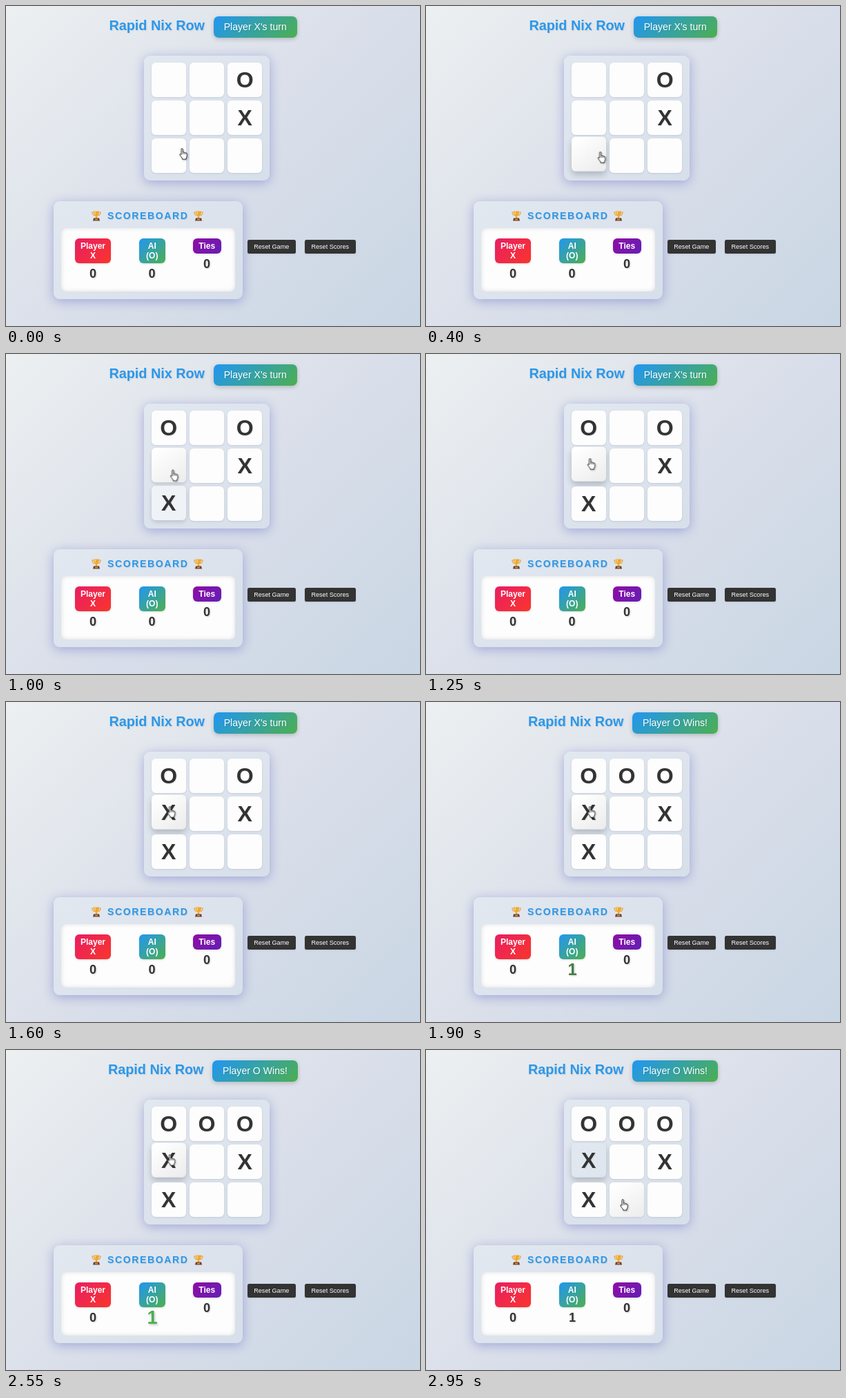
An HTML page that plays this animation: 600x464 px, repeating every 3 s.

```html
<!DOCTYPE html>
<html lang="en">
<head>
<meta charset="utf-8">
<title>Rapid Nix Row</title>
<style>
  html, body { margin: 0; width: 100%; height: 100%; overflow: hidden; }
  body { font-family: "Liberation Sans", Arial, sans-serif; color: #333; }
  .stage {
    position: relative; width: 600px; height: 464px; overflow: hidden;
    background: linear-gradient(135deg, #ecf0f1 0%, #dadfea 50%, #c9d6e4 100%);
  }
  .stage * { box-sizing: border-box; }
  .abs, .panel, .cell, .badge, .score, .button, .status, .trophy { position: absolute; }

  .header { position: absolute; inset: 0; }
  .title {
    position: absolute; left: 149.5px; top: 16px; white-space: nowrap;
    font: bold 19.8px/25px "Liberation Sans", Arial, sans-serif;
    color: #2b98ea; text-shadow: 1px 1px 2px rgba(0, 0, 0, .1);
  }
  .status {
    left: 300.5px; top: 15px; width: 121.5px; height: 31px; border-radius: 7px;
    font-size: 14.1px; line-height: 31px; text-align: center; white-space: nowrap; color: #fff;
    background: linear-gradient(135deg, #2196f3, #4caf50);
    box-shadow: 0 2px 6px rgba(0, 0, 0, .2);
    text-shadow: 1px 1px 1px rgba(0, 0, 0, .12);
  }
  .won .title { left: 148px; }
  .won .status { left: 299px; width: 124px; }

  .panel {
    border-radius: 9px;
    background: linear-gradient(145deg, #e2e8f0, #d7dfea);
    box-shadow: 0 3px 16px rgba(75, 80, 190, .4);
  }
  .board { left: 199.5px; top: 71.5px; width: 182.5px; height: 181.5px; }
  .cell {
    left: calc(11px + var(--c) * 55.2px); top: calc(10.7px + var(--r) * 55px);
    width: 50.5px; height: 50.3px; border-radius: 6px;
    background-color: #fdfdfd; box-shadow: 0 1px 3px rgba(0, 0, 0, .1);
    font-weight: bold; font-size: 32px; line-height: 50px; text-align: center;
  }
  .cell::before {
    content: ""; position: absolute; inset: 0; border-radius: 6px; opacity: 0;
    background: linear-gradient(145deg, #fff 10%, #ececec);
  }
  .cell span { position: relative; display: block; text-shadow: 1px 1px 1px rgba(0, 0, 0, .08); }

  .scores { left: 69px; top: 283px; width: 273.5px; height: 141.5px; }
  .heading {
    left: 147px; top: 295px; white-space: nowrap;
    font-weight: bold; font-size: 14px; line-height: 18px; letter-spacing: 1.65px;
    color: #2b98ea; text-shadow: 1px 1px 1px rgba(0, 0, 0, .1);
  }
  .trophy { top: 296.5px; width: 14px; height: 15px; }
  .inner {
    left: 79.5px; top: 322px; width: 252px; height: 91.5px; border-radius: 7px;
    background: #fdfdfd; box-shadow: inset 0 0 6px rgba(0, 0, 0, .13);
  }
  .badge {
    top: 337px; border-radius: 6px; padding-top: 4px; color: #fff; text-align: center;
    font-weight: bold; font-size: 12px; line-height: 14px;
    box-shadow: 0 1px 3px rgba(0, 0, 0, .15);
  }
  .player { left: 100px; width: 52px; height: 36px; background: linear-gradient(135deg, #e91e63, #f9352c); }
  .ai { left: 192.5px; width: 38.5px; height: 36px; background: linear-gradient(135deg, #2196f3, #4caf50); }
  .ties { left: 271px; width: 40.5px; height: 22px; background: linear-gradient(135deg, #8e0da5, #651fb4); }
  .score {
    width: 40px; height: 22px; text-align: center;
    font-weight: bold; font-size: 18px; line-height: 22px;
    text-shadow: 1px 1px 2px rgba(0, 0, 0, .2);
  }
  .button {
    top: 339px; height: 20px; border-radius: 2.5px; background: #333; color: #fff;
    font-size: 9.1px; line-height: 20px; text-align: center; white-space: nowrap;
    box-shadow: 0 1px 2px rgba(0, 0, 0, .12);
  }
  .cursor { left: 0; top: 0; width: 12px; height: 17px; overflow: visible;
    filter: drop-shadow(1px 1px 1px rgba(0, 0, 0, .3)); }

  /* Motion: every track shares one 3 s loop. */
  .x1 { animation: show-x1 3s step-end infinite; }
  .o1 { animation: show-o1 3s step-end infinite; }
  .x2 { animation: show-x2 3s step-end infinite; }
  .won { animation: show-win 3s step-end infinite; }
  .before { animation: hide-win 3s step-end infinite; }
  .pulse { animation: pulse 3s ease infinite; }
  .cursor { animation: point 3s ease-in-out infinite; }
  .h1 { animation: lift-1 3s ease infinite; }
  .h1::before { animation: glow-1 3s step-end infinite; }
  .h2 { animation: lift-2 3s ease infinite; }
  .h2::before { animation: glow-2 3s step-end infinite; }
  .h3::before { animation: glow-3 3s step-end infinite; }
  .stage {
    --flat: 0 1px 3px rgba(0, 0, 0, .1);
    --raised: 0 5px 10px rgba(0, 0, 0, .2);
  }

  @keyframes show-x1 { 0% { opacity: 0; } 15%, 100% { opacity: 1; } }
  @keyframes show-o1 { 0% { opacity: 0; } 20%, 100% { opacity: 1; } }
  @keyframes show-x2 { 0% { opacity: 0; } 53.3%, 100% { opacity: 1; } }
  @keyframes show-win { 0% { opacity: 0; } 60%, 100% { opacity: 1; } }
  @keyframes hide-win { 0% { opacity: 1; } 60%, 100% { opacity: 0; } }
  @keyframes glow-1 { 0% { opacity: 0; } 1.6% { opacity: 1; } 30%, 100% { opacity: 0; } }
  @keyframes glow-2 { 0% { opacity: 0; } 31% { opacity: 1; } 97.8%, 100% { opacity: 0; } }
  @keyframes glow-3 { 0% { opacity: 0; } 97.8%, 100% { opacity: 1; } }
  @keyframes lift-1 {
    0%, 1.6% { transform: none; box-shadow: var(--flat); background-color: #fdfdfd; }
    11.6%, 30% { transform: translateY(-2.5px); box-shadow: var(--raised); background-color: #fdfdfd00; }
    40%, 100% { transform: none; box-shadow: var(--flat); background-color: #fdfdfd; }
  }
  @keyframes lift-2 {
    0%, 31% { transform: none; box-shadow: var(--flat); background-color: #fdfdfd; }
    41%, 97.8% { transform: translateY(-2.5px); box-shadow: var(--raised); background-color: #fdfdfd00; }
    100% { transform: translateY(-2.2px); box-shadow: var(--raised); background-color: #fdfdfd30; }
  }
  @keyframes pulse {
    0%, 59.8% { transform: none; color: #333; }
    69.8%, 87.3% { transform: scale(1.5); color: #4caf50; }
    96.7%, 100% { transform: none; color: #333; }
  }
  @keyframes point {
    0% { transform: translate(251px, 206px); }
    6%, 27% { transform: translate(248.5px, 211px); }
    37%, 95% { transform: translate(233.5px, 151px); }
    98%, 100% { transform: translate(281px, 216px); }
  }
</style>
</head>
<body>
<div class="stage">
  <div class="header before">
    <div class="title">Rapid Nix Row</div>
    <div class="status">Player X's turn</div>
  </div>
  <div class="header won">
    <div class="title">Rapid Nix Row</div>
    <div class="status">Player O Wins!</div>
  </div>

  <div class="panel board">
    <div class="cell" style="--r:0;--c:0"><span class="o1">O</span></div>
    <div class="cell" style="--r:0;--c:1"><span class="won">O</span></div>
    <div class="cell" style="--r:0;--c:2"><span>O</span></div>
    <div class="cell h2" style="--r:1;--c:0"><span class="x2">X</span></div>
    <div class="cell" style="--r:1;--c:1"></div>
    <div class="cell" style="--r:1;--c:2"><span>X</span></div>
    <div class="cell h1" style="--r:2;--c:0"><span class="x1">X</span></div>
    <div class="cell h3" style="--r:2;--c:1"></div>
    <div class="cell" style="--r:2;--c:2"></div>
  </div>

  <div class="panel scores"></div>
  <svg width="0" height="0" class="abs">
    <symbol id="cup" viewBox="0 0 14 15">
      <path d="M3.5 2H1q0 4 3.5 5M10.5 2H13q0 4-3.5 5" fill="none" stroke="#e6a23a" stroke-width="1.2"/>
      <path d="M3 .5h8q0 6-3 7.5l.5 3h-3L6 8Q3 6.500 3 .5Z" fill="#f0a830"/>
      <path d="M4.300 1h1.700v5.500Q4.500 5 4.300 1Z" fill="#ffd267"/>
      <path d="M3 10.500h8l1 4H2Z" fill="#70402c"/>
      <path d="M5 11.700h4v1.600H5Z" fill="#d99a42"/>
    </symbol>
  </svg>
  <svg class="trophy" style="left:123.500px"><use href="#cup"/></svg>
  <div class="abs heading">SCOREBOARD</div>
  <svg class="trophy" style="left:272px"><use href="#cup"/></svg>

  <div class="abs inner"></div>
  <div class="badge player">Player<br>X</div>
  <div class="badge ai">AI<br>(O)</div>
  <div class="badge ties">Ties</div>
  <div class="score" style="left:106px;top:377px">0</div>
  <div class="score before" style="left:191.500px;top:377px">0</div>
  <div class="score won" style="left:191.500px;top:377px"><div class="pulse">1</div></div>
  <div class="score" style="left:271px;top:363px">0</div>

  <div class="button" style="left:349.500px;width:70.500px">Reset Game</div>
  <div class="button" style="left:432.500px;width:74.500px">Reset Scores</div>

  <svg class="abs cursor" viewBox="0 0 12 17">
    <path d="M3 9.500V1.800Q3 .6 4.100 .6T5.200 1.800V6Q6.800 5.300 7.200 6.400Q8.700 5.900 9.100 7Q11.200 6.700 11.200 8.500V11.500Q11.200 13 10 14.500V16.200H4.500V14.800Q2.500 12.500 1 10Q.5 8.500 1.600 8.500Q2.400 8.600 3 9.500Z"
      fill="#fff" stroke="#222" stroke-width=".9" stroke-linejoin="round"/>
    <path d="M5.200 6v3M7.200 6.500V9M9.200 7.200V9.300" stroke="#222" stroke-width=".7"/>
  </svg>
</div>
</body>
</html>
```
